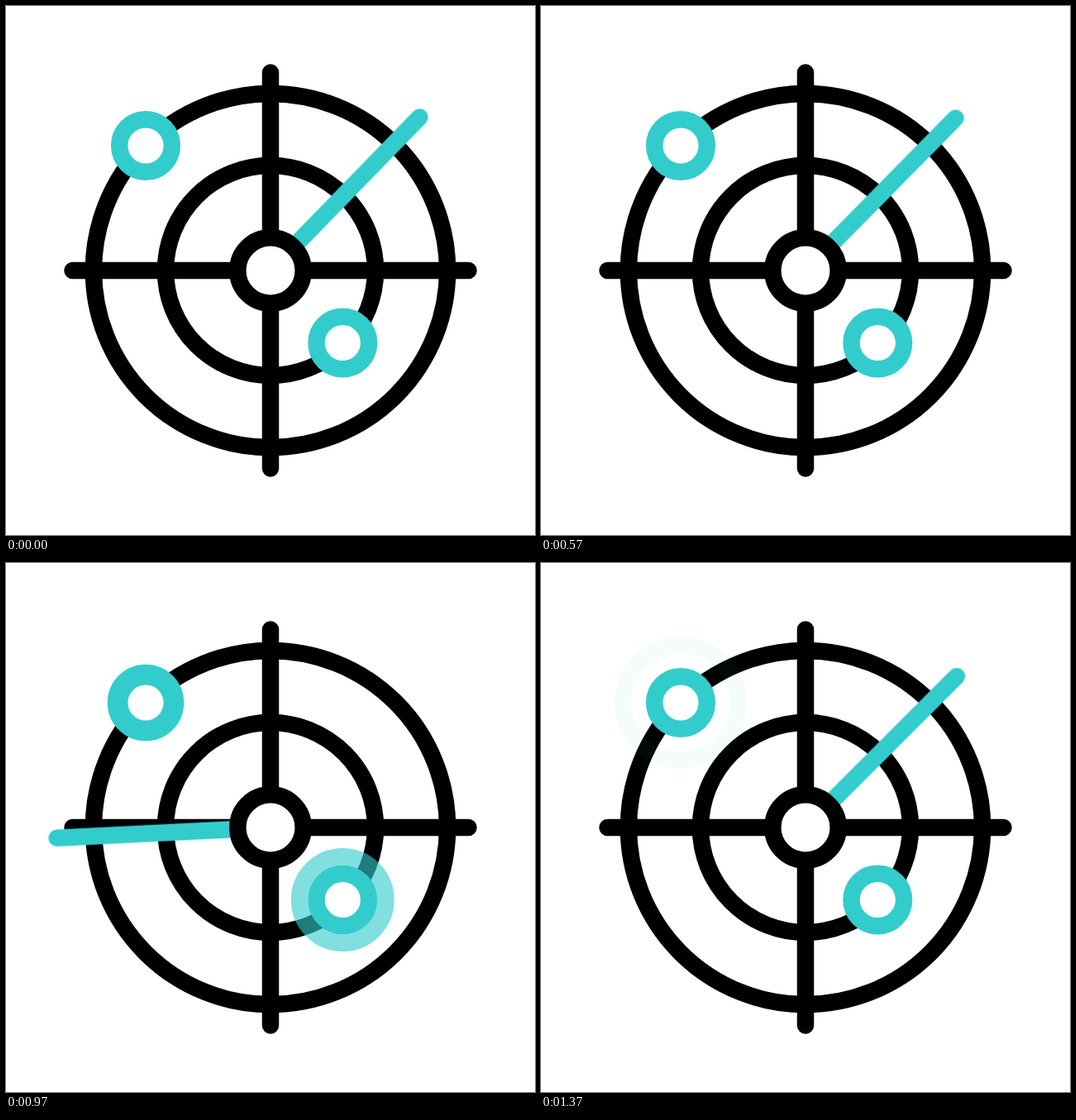
An HTML page for the animation above (1.67 s loop, 640 by 640 pixels).

```html
<!DOCTYPE html>
<html lang="en">
<head>
<meta charset="utf-8">
<title>Radar sweep</title>
<style>
  html, body { margin: 0; width: 100%; height: 100%; overflow: hidden; background: #fff; }
  svg { display: block; width: 100%; height: 100%; }
  .ink, .teal { fill: none; stroke: #000; stroke-width: 20.5; stroke-linecap: round; }
  .teal { stroke: #3cc; }
  .solid { fill: #fff; }
  .ping { opacity: 0; }
  #arm { transform-origin: 320px 320px; }
</style>
</head>
<body>
<svg viewBox="0 0 640 640">
  <g class="ink">
    <circle cx="320" cy="320" r="214.1"/>
    <circle cx="320" cy="320" r="127"/>
    <path d="M320 80.5V559.5M80.5 320H559.5"/>
  </g>
  <circle id="pingA" class="teal ping" cx="169" cy="169"/>
  <circle id="pingB" class="teal ping" cx="407.3" cy="407.5"/>
  <circle class="teal solid" cx="169" cy="169" r="31.8"/>
  <circle class="teal solid" cx="407.3" cy="407.5" r="31.8"/>
  <path id="arm" class="teal" d="M320 320V61.2"/>
  <circle class="ink solid" cx="320" cy="320" r="39.7"/>
</svg>
<script>
const LOOP = 1670, STEP = 100 / 3, LAST = 41;
const byId = id => document.getElementById(id);

// Paused animation whose begin and end are counted in steps.
function timeline(id, begin, end, frames, fill) {
  const anim = byId(id).animate(frames, {
    delay: begin * STEP, duration: (end - begin) * STEP, fill
  });
  anim.pause();
  return anim;
}

// The arm winds back, then swings once around.
function sweep(begin, back, go, end) {
  const easing = 'cubic-bezier(.305, 0, .695, 1)';
  const at = step => (step - begin) / (end - begin);
  return timeline('arm', begin, end, [
    { transform: 'rotate(45deg)', offset: 0, easing },
    { transform: 'rotate(17deg)', offset: at(back) },
    { transform: 'rotate(17deg)', offset: at(go), easing },
    { transform: 'rotate(405deg)', offset: 1 }
  ], 'both');
}

// A ring grows evenly from its dot and fades after the first third.
const ping = (id, begin, end, reach) => timeline(id, begin, end, [
  { r: '31.8px', opacity: 1, offset: 0 },
  { opacity: 1, offset: .35 },
  { r: reach + 'px', opacity: 0, offset: 1 }
], 'none');

const parts = [
  sweep(-1.3, 12.5, 12.83, 39.7),
  ping('pingA', 27.5, 41.4, 71),
  ping('pingB', 21.2, 34.2, 65.8)
];

const start = performance.now();

function tick() {
  const t = (performance.now() - start) % LOOP;
  const step = Math.min(LAST, Math.floor((t + 4) / STEP));
  for (const part of parts) part.currentTime = step * STEP;
  requestAnimationFrame(tick);
}

tick();
</script>
</body>
</html>
```
